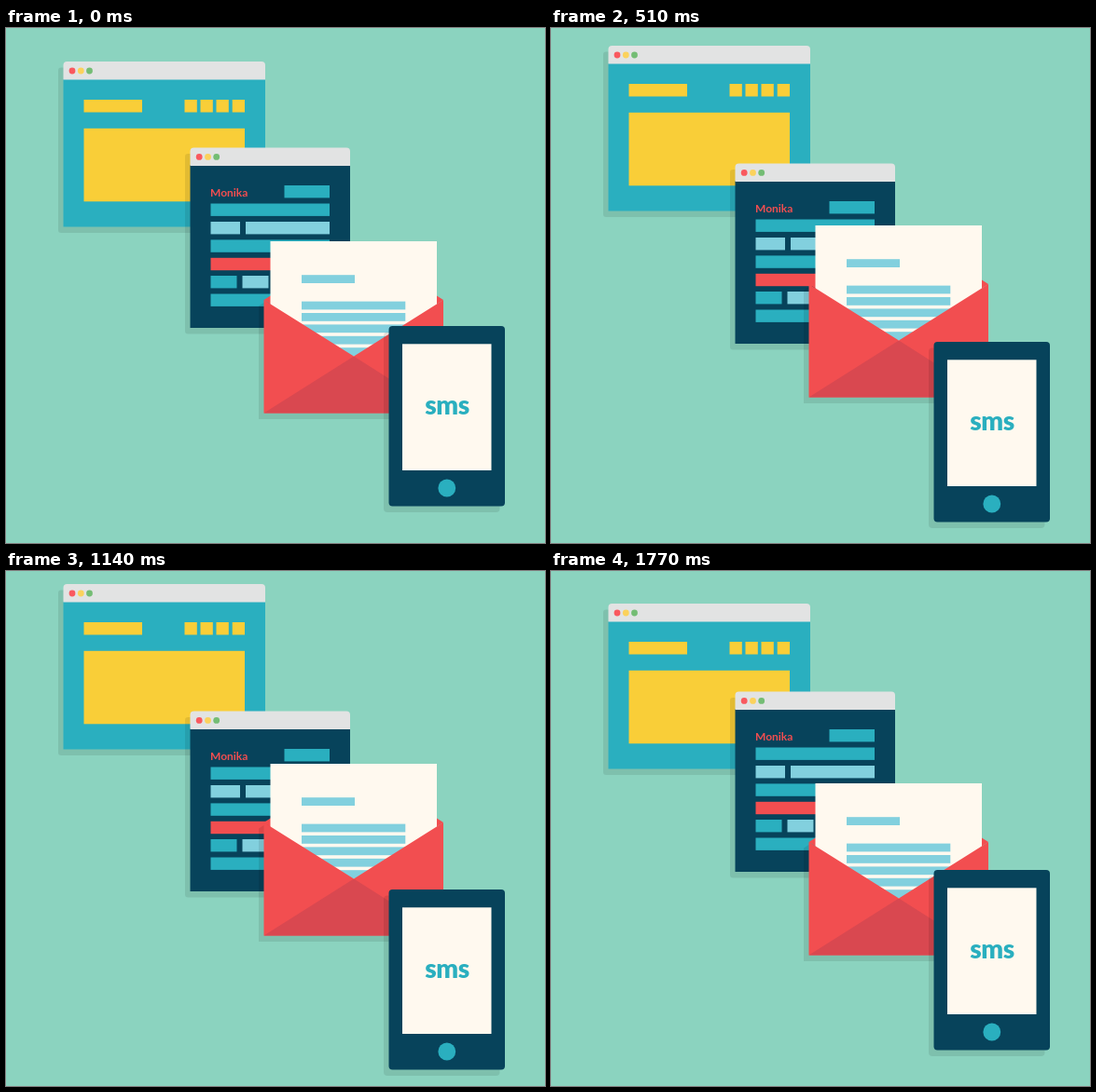
Animation of 578x553 px, one loop 1.8 s. Source, as an HTML page:

```html
<!DOCTYPE html>
<html lang="en">
<head>
<meta charset="utf-8">
<title>Floating messages</title>
<style>
  html, body { margin: 0; width: 100%; height: 100%; overflow: hidden; background: #8bd3bf; }
  svg { display: block; width: 100vw; height: 100vh; }
  text { font-family: Lato, "Open Sans", sans-serif; font-weight: 700; }

  .teal { fill: #2aafbf; }
  .navy { fill: #07435b; }
  .sky { fill: #82d0de; }
  .red { fill: #f24e50; }
  .crimson { fill: #d94850; }
  .yellow { fill: #f9ce38; }
  .cream { fill: #fff9ef; }
  .bar { fill: #e2e3e3; }
  .shadow { fill: #000; fill-opacity: .09; transform: translate(-5.5px, 6.5px); }

  /* One pixel every 30 ms, there and back */
  .up, .down { animation: drift 1800ms steps(30, end) infinite; }
  .up { --shift: -30px; }
  .down { --shift: 30px; }
  @keyframes drift {
    0%, 100% { transform: translateY(0); }
    50% { transform: translateY(var(--shift)); }
  }
</style>
</head>
<body>
<svg viewBox="0 0 578 553">
  <defs>
    <g id="dots">
      <circle r="3.4" fill="#f9595f"/>
      <circle r="3.4" cx="9.3" fill="#fbd25c"/>
      <circle r="3.4" cx="18.5" fill="#74bd74"/>
    </g>
  </defs>

  <!-- Web page -->
  <g class="up">
    <rect class="shadow" x="61.5" y="36" width="216.5" height="177.5" rx="3"/>
    <path class="teal" d="M61.5 55H278V213.5H61.5z"/>
    <path class="bar" d="M61.5 55.5V40q0-4 4-4H274q4 0 4 4V55.5z"/>
    <use href="#dots" x="71" y="46"/>
    <g class="yellow">
      <rect x="83.5" y="77" width="62.5" height="13.5"/>
      <rect x="191.5" y="77" width="13.3" height="13.5"/>
      <rect x="208.5" y="77" width="13.3" height="13.5"/>
      <rect x="225.5" y="77" width="13.3" height="13.5"/>
      <rect x="242.7" y="77" width="13.3" height="13.5"/>
      <rect x="83.5" y="107.8" width="172.5" height="78.5"/>
    </g>
  </g>

  <!-- Form page -->
  <g class="down">
    <rect class="shadow" x="197.5" y="128.5" width="171.5" height="193.5" rx="3"/>
    <path class="navy" d="M197.5 147H369V322H197.5z"/>
    <path class="bar" d="M197.5 148V132.5q0-4 4-4H365q4 0 4 4V148z"/>
    <use href="#dots" x="207.2" y="138.4"/>
    <text class="red" x="219" y="181" font-size="12">Monika</text>
    <g class="teal">
      <rect x="298.5" y="169" width="48.5" height="13.4"/>
      <rect x="219.5" y="188.5" width="127.5" height="13.4"/>
      <rect x="219.5" y="227.4" width="127.5" height="13.4"/>
      <rect x="219.5" y="266" width="28" height="13.4"/>
      <rect x="219.5" y="285.5" width="127.5" height="13.4"/>
    </g>
    <g class="sky">
      <rect x="219.5" y="208" width="31.5" height="13.4"/>
      <rect x="257" y="208" width="90" height="13.4"/>
      <rect x="253.5" y="266" width="28" height="13.4"/>
    </g>
    <rect class="red" x="219.5" y="246.8" width="127.5" height="13.4"/>
  </g>

  <!-- Letter -->
  <g class="up">
    <path class="shadow" d="M276.5 292L283.5 287.5H462L469 292V413.5H276.5z"/>
    <path class="red" d="M276.5 292L283.5 287.5H462L469 292L373 353z"/>
    <path class="cream" d="M283.5 229H462V360H283.5z"/>
    <g class="sky">
      <rect x="317" y="265.2" width="57" height="8.8"/>
      <rect x="317" y="293.6" width="111.3" height="8.8"/>
      <rect x="317" y="306" width="111.3" height="8.8"/>
      <rect x="317" y="318.4" width="111.3" height="8.8"/>
      <rect x="317" y="330.8" width="111.3" height="8.8"/>
      <rect x="317" y="343.2" width="111.3" height="8.8"/>
    </g>
    <path class="red" d="M276.5 292L373 352.5L469 292V413.5H276.5z"/>
    <path class="crimson" d="M276.5 413.5L373 352.5L469 413.5z"/>
  </g>

  <!-- Phone -->
  <g class="down">
    <rect class="shadow" x="410.5" y="320" width="124.5" height="193.5" rx="4"/>
    <rect class="navy" x="410.5" y="320" width="124.5" height="193.5" rx="4"/>
    <rect class="cream" x="425" y="339.3" width="95.5" height="135.7"/>
    <text class="teal" x="473" y="414.5" font-size="28" letter-spacing="-.5" text-anchor="middle" style="font-weight:900">sms</text>
    <circle class="teal" cx="472.8" cy="494" r="9.4"/>
  </g>
</svg>
</body>
</html>
```
